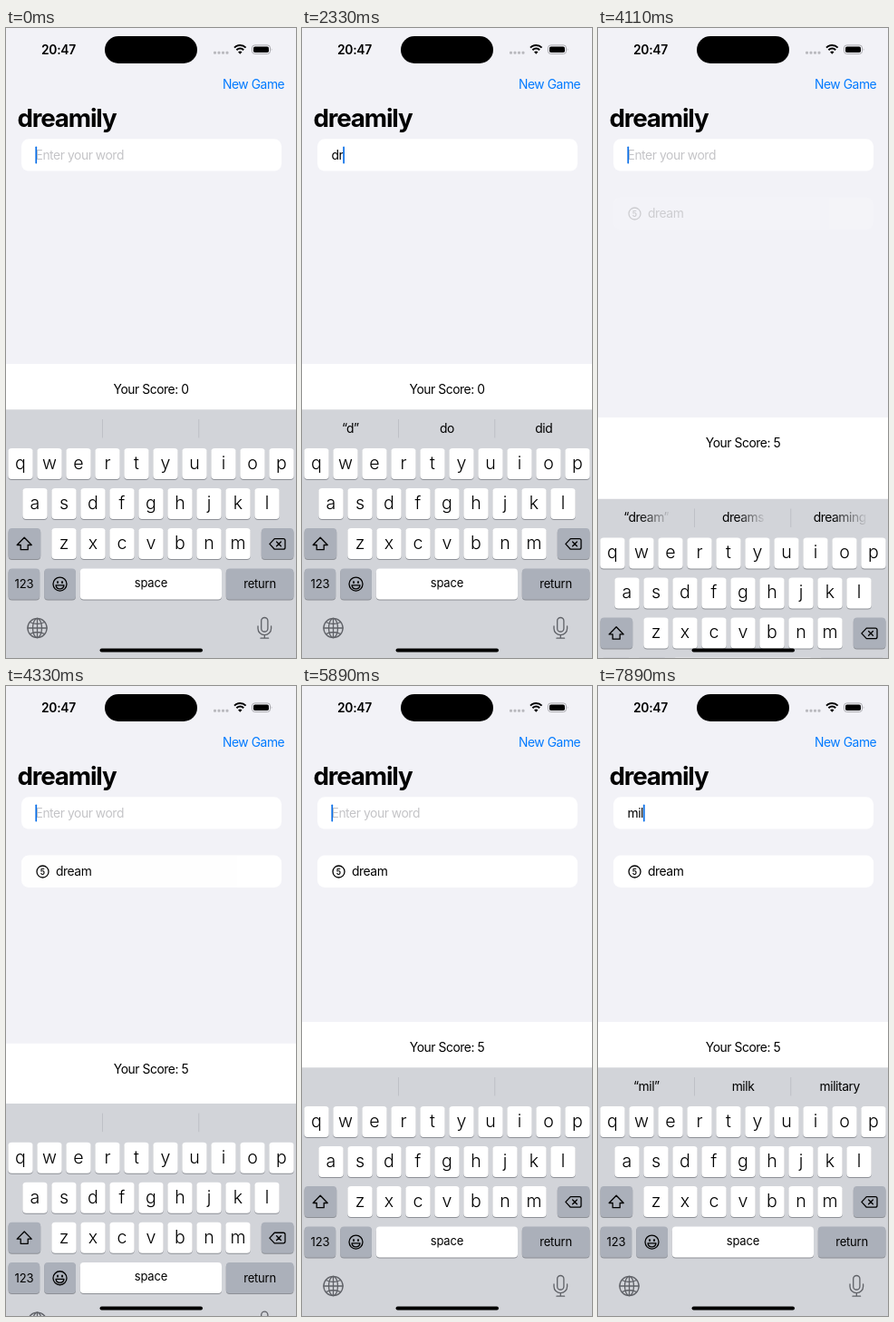
An HTML page for the animation above (8 s loop, 320 px wide and 694 px high).

```html
<!DOCTYPE html>
<html lang="en">
<head>
<meta charset="utf-8">
<title>Word game</title>
<style>
  html, body { margin: 0; width: 100%; height: 100%; overflow: hidden; background: #f2f2f7; }
  svg { display: block; width: 320px; height: 694px; }
  text { font: 13.84px Inter, sans-serif; font-optical-sizing: none; letter-spacing: -.43px; }
  .mid { text-anchor: middle; }
  .title { font-size: 27.7px; font-weight: 700; letter-spacing: -1.15px; }
  .clock { font-weight: 600; letter-spacing: -.3px; }
  .letter { font-size: 19.6px; font-weight: 300; letter-spacing: 0; }
  .label { font-size: 13px; letter-spacing: -.2px; }
  .big { font-size: 30px; font-weight: 300; letter-spacing: 0; }
  .count { font-size: 8.6px; font-weight: 600; letter-spacing: 0; }
  .line { fill: none; stroke: #000; stroke-width: 1.3; stroke-linecap: round; stroke-linejoin: round; }
  .soft { stroke: #5f6167; }
  #bubble { filter: drop-shadow(0 1px 2px rgba(0, 0, 0, .28)); }
</style>
</head>
<body>
<svg viewBox="0 0 320 694">
  <defs>
    <linearGradient id="sweep">
      <stop offset="0"/>
      <stop offset="1" stop-opacity="0"/>
    </linearGradient>
  </defs>
  <rect width="320" height="694" fill="#f2f2f7"/>

  <!-- status bar -->
  <text class="clock" x="39" y="28.8">20:47</text>
  <rect x="109" y="9" width="102" height="30" rx="15"/>
  <g fill="#b9b9be">
    <rect x="229" y="25.8" width="3" height="3" rx="1"/>
    <rect x="233.5" y="25.8" width="3" height="3" rx="1"/>
    <rect x="238" y="25.8" width="3" height="3" rx="1"/>
    <rect x="242.5" y="25.8" width="3" height="3" rx="1"/>
  </g>
  <path d="M252 21.6a8.8 8.8 0 0 1 12.6 0M254.4 24.2a5.4 5.4 0 0 1 7.8 0" fill="none" stroke="#000" stroke-width="2"/>
  <path d="M258.3 28.8l-2.2-2.3a3.2 3.2 0 0 1 4.4 0z"/>
  <rect x="271.5" y="18.9" width="20" height="9.6" rx="3" fill="none" stroke="#a3a3a8" stroke-width=".9"/>
  <rect x="273" y="20.4" width="17" height="6.6" rx="1.8"/>
  <path d="M292.8 22.2q1.4 1.5 0 3z" fill="#a3a3a8"/>

  <!-- page -->
  <text x="239" y="66.8" fill="#007aff">New Game</text>
  <text class="title" x="12.5" y="109">dreamily</text>
  <rect x="17" y="122.3" width="287" height="35.3" rx="8" fill="#fff"/>
  <text id="hint" x="32.5" y="145" fill="#c4c4c7">Enter your word</text>
  <text id="word" x="32.5" y="145"></text>
  <rect id="caret" y="130.5" width="1.7" height="19" rx=".8" fill="#0a6fe8"/>
  <g id="row">
    <rect x="17" y="186.6" width="287" height="35.3" rx="8" fill="#fff"/>
    <circle class="line" cx="40.5" cy="204.5" r="6.5"/>
    <text class="count mid" x="40.5" y="207.6">5</text>
    <text x="55" y="209.4">dream</text>
  </g>
  <g id="panel">
    <rect y="370" width="320" height="330" fill="#fff"/>
    <text id="score" class="mid" x="160" y="403"></text>
  </g>

  <g id="board">
    <rect y="420.3" width="320" height="280" fill="#d2d4d9"/>
    <path d="M106.5 431v20.5M212.8 431v20.5" stroke="#bcbec4" stroke-width=".9"/>
    <g id="tips" class="mid" fill="url(#sweep)">
      <text x="53.3" y="446"></text>
      <text x="160" y="446"></text>
      <text x="266.7" y="446"></text>
    </g>
    <g id="keys"></g>
    <path class="line" d="M20.2 561.3l8 8.2h-4v5.2h-8v-5.2h-4z"/>
    <path class="line" d="M296.3 562.6h9.7q2 0 2 2v7.6q0 2-2 2h-9.7l-5.4-5.8zM298.6 566l4.8 4.8M303.4 566l-4.8 4.8"/>
    <circle class="line" cx="59.5" cy="612.6" r="7.5"/>
    <ellipse cx="57" cy="610.4" rx="1" ry="1.5"/>
    <ellipse cx="62" cy="610.4" rx="1" ry="1.5"/>
    <path class="line" d="M55 613.8h9q-.6 4-4.5 4t-4.5-4z"/>
    <g class="line soft">
      <circle cx="34.5" cy="661" r="10.6"/>
      <ellipse cx="34.5" cy="661" rx="5" ry="10.6"/>
      <path d="M34.5 650.4v21.2M23.9 661h21.2M26.5 654.5q8 4 16 0M26.5 667.5q8-4 16 0"/>
      <rect x="281.7" y="649.5" width="7.2" height="15.5" rx="3.6"/>
      <path d="M278 659v2.4a7.3 7.3 0 0 0 14.6 0V659M285.3 668.8v3.4M281 672.2h8.6"/>
    </g>
    <g id="bubble">
      <path fill="#fff"/>
      <text class="big mid"></text>
    </g>
  </g>
  <rect x="103.5" y="683.5" width="113.5" height="4" rx="2"/>
</svg>

<script>
const LOOP = 8000, SUBMIT = 4000;
const $ = id => document.getElementById(id);
const clamp = x => Math.min(1, Math.max(0, x));
const ramp = (t, a, b) => clamp((t - a) / (b - a));

// letter, press, release
const taps = [
  ['d', 1560, 1770], ['r', 2120, 2320], ['e', 2440, 2640], ['a', 2890, 3100], ['m', 3440, 3660],
  ['m', 6440, 6640], ['i', 6890, 7090], ['l', 7340, 7550]
];

// start, suggestions
const tips = [
  [0, '', '', ''],
  [1850, '“d”', 'do', 'did'],
  [2400, '“dr”', 'drive', 'dress'],
  [2710, '“dre”', 'dress', 'dressed'],
  [3170, '“drea”', 'drew', 'dream'],
  [4000, '“dream”', 'dreams', 'dreaming'],
  [4290, '', '', ''],
  [6710, '“m”', 'my', 'me'],
  [7160, '“mi”', 'mid', 'might'],
  [7620, '“mil”', 'milk', 'military']
];

const places = {};
let markup = '';
function addKey(x, y, w, fill, label = '', base = 23, style = 'letter', id = '') {
  const box = (dy, color, name) =>
    `<rect ${name} x="${x}" y="${y + dy}" width="${w}" height="34" rx="4" fill="${color}"/>`;
  markup += box(1, '#8d9096', '') + box(0, fill, id && `id="${id}"`) +
    `<text class="${style} mid" x="${x + w / 2}" y="${y + base}">${label}</text>`;
}
['qwertyuiop', 'asdfghjkl', 'zxcvbnm'].forEach((letters, r) => {
  [...letters].forEach((c, i) => {
    const x = [16, 32, 64][r] + 32 * i, y = 463 + 44 * r;
    places[c] = [x, y];
    addKey(x - 13.7, y, 27.4, '#fff', c);
  });
});
const GREY = '#abb0ba';
addKey(2.6, 551, 35.6, GREY);
addKey(281.8, 551, 35.6, GREY);
addKey(2.6, 595.4, 34.6, GREY, '123', 21.6, 'label');
addKey(42.2, 595.4, 34.8, GREY);
addKey(81.8, 595.4, 156.2, '#fff', 'space', 20.4, 'label');
addKey(242.8, 595.4, 74.6, GREY, 'return', 21.6, 'label', 'enter');
$('keys').innerHTML = markup;

const shown = (el, on) => el.setAttribute('visibility', on ? 'visible' : 'hidden');
const shift = (id, y) => $(id).setAttribute('transform', `translate(0 ${y.toFixed(2)})`);

function bubblePath(x, y) {
  return `M${x - 16.5} ${y - 52}h33q8 0 8 8v29c0 9-10.8 9-10.8 19v26q0 4-4 4h-19.4q-4 0-4-4v-26` +
    `c0-10-10.8-10-10.8-19v-29q0-8 8-8z`;
}

// keyboard starts to leave, then is called back
function drop(t) {
  if (t < 3990) return 0;
  if (t < 4160) return 110 * Math.sin((t - 3990) / 170 * Math.PI / 2);
  const y = 110 * Math.exp(-(t - 4160) * .006);
  return t > 5050 ? 0 : y;
}

function caretAlpha(t) {
  if (t < 1500) return 1 - ramp(t, 490, 650) + ramp(t, 1120, 1210);
  return 1 - ramp(t, 5360, 5520) + ramp(t, 5690, 5850);
}

function draw(t) {
  const done = t >= SUBMIT;
  const typed = taps.filter(k => k[2] <= t && (k[2] > SUBMIT) === done).map(k => k[0]).join('');
  const word = $('word');
  word.textContent = typed;
  shown($('hint'), !typed);
  $('caret').setAttribute('x', 32.4 + (typed ? word.getComputedTextLength() : 0));
  $('caret').setAttribute('opacity', caretAlpha(t));

  $('row').setAttribute('opacity', ramp(t, 4070, 4340));
  $('score').textContent = 'Your Score: ' + (done ? 5 : 0);
  const y = drop(t);
  shift('board', y);
  shift('panel', y * .6);

  const [start, ...names] = tips.filter(s => s[0] <= t).pop();
  names.forEach((s, i) => { $('tips').children[i].textContent = s; });
  const edge = -.7 + 2.1 * ramp(t, start, start + 220);
  $('sweep').setAttribute('x1', edge);
  $('sweep').setAttribute('x2', edge + .7);

  const tap = taps.find(k => t >= k[1] && t < k[2]);
  shown($('bubble'), tap);
  if (tap) {
    const [x, ky] = places[tap[0]], [shape, label] = $('bubble').children;
    shape.setAttribute('d', bubblePath(x, ky));
    label.setAttribute('x', x);
    label.setAttribute('y', ky - 19);
    label.textContent = tap[0];
  }
  $('enter').setAttribute('fill', t >= 3870 && t < 3990 ? '#fff' : GREY);
}

let begin;
function tick(now) {
  begin ??= now;
  draw((now - begin) % LOOP);
  requestAnimationFrame(tick);
}
draw(0);
requestAnimationFrame(tick);
</script>
</body>
</html>
```
